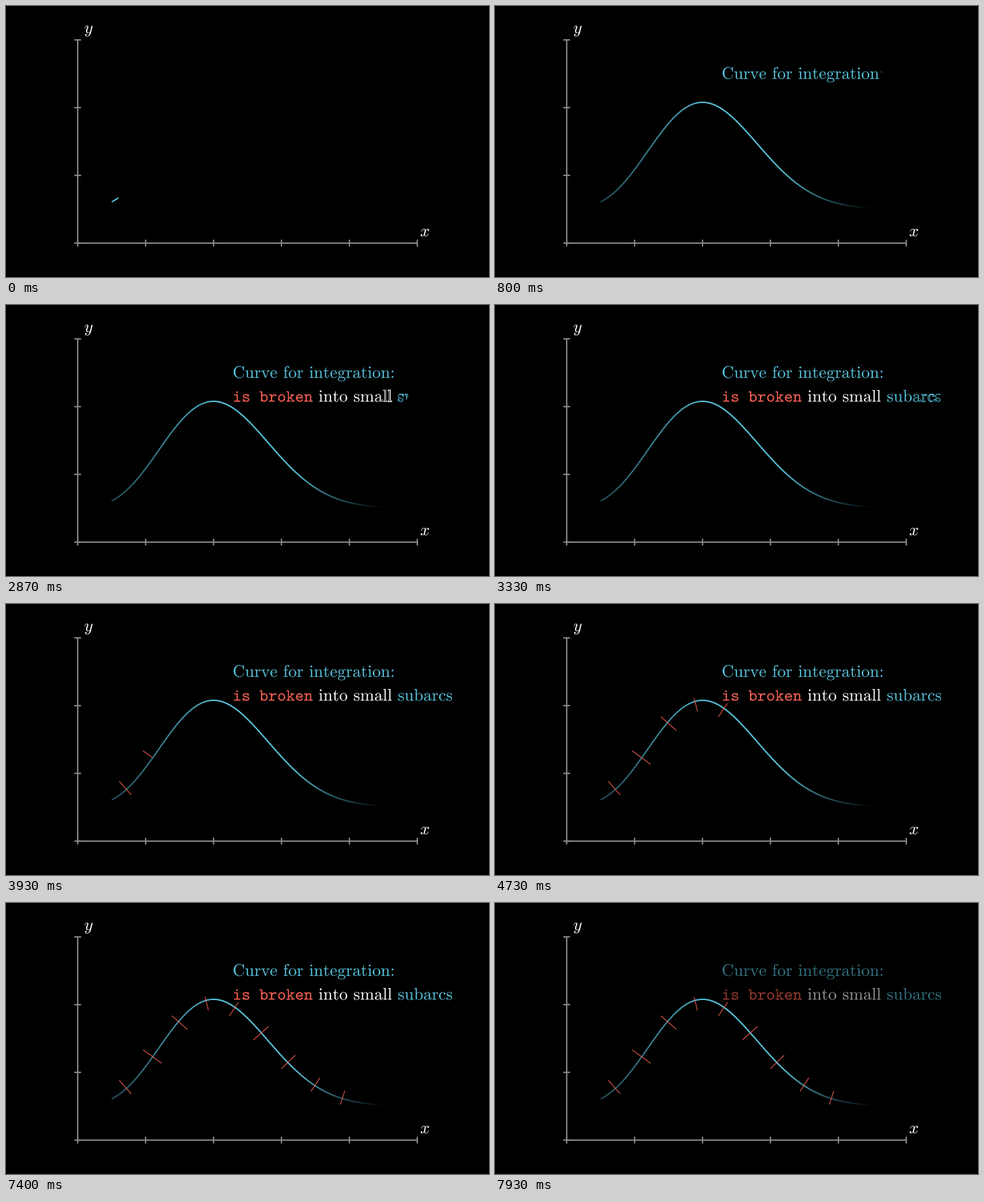
These frames come from a looping animation (640 by 360 pixels, 8000 ms). A matplotlib script:

```python
import numpy as np
import matplotlib.pyplot as plt
from matplotlib.animation import FuncAnimation
from matplotlib.collections import LineCollection
from matplotlib.colors import to_rgb
from matplotlib.patches import PathPatch
from matplotlib.path import Path
from matplotlib.text import Text
from matplotlib.textpath import text_to_path

W, H, DPI = 640, 360, 100
FRAMES, LOOP_MS = 120, 8000
PX = 72 / DPI  # one pixel in points
SECOND = 15    # frames per second
EM = 22.5
BLUE, RED, WHITE, GREY = "#58C4DD", "#FC6255", "#FFFFFF", "#888888"
ORIGIN = np.array([95, 315])
UNIT = 90

plt.rcParams["mathtext.fontset"] = "cm"
plt.rcParams["path.snap"] = False

fig = plt.figure(figsize=(W / DPI, H / DPI), dpi=DPI, facecolor="black")
ax = fig.add_axes([0, 0, 1, 1])
ax.set_xlim(0, W)
ax.set_ylim(H, 0)
ax.axis("off")


def smooth(t):
    t = np.clip(t, 0, 1)
    low = 1 / (1 + np.exp(5))
    return float(np.clip((1 / (1 + np.exp(-10 * (t - 0.5))) - low) / (1 - 2 * low), 0, 1))


def line(p, q, color, width, z=1):
    return ax.plot([p[0], q[0]], [p[1], q[1]], color=color, lw=width * PX,
                   solid_capstyle="butt", zorder=z)[0]


# --- glyph outlines ---

def glyphs(tex, x=0, y=0):
    """Outline polygons of each glyph, baseline starting at (x, y)."""
    prop = Text().get_fontproperties()
    infos, shapes, _ = text_to_path.get_glyphs_mathtext(prop, f"${tex}$")
    k = EM / text_to_path.FONT_SCALE
    result = []
    for name, gx, _, size in infos:
        verts, codes = shapes[name]
        polys = Path(verts, codes).to_polygons()
        polys.sort(key=lambda p: -p[:, 1].max())
        result.append([p * [k * size, -k * size] + [x + gx * k, y] for p in polys])
    return result


def cut(polys, part):
    """The first part (0 to 1) of the outlines, by length."""
    steps = [np.hypot(*np.diff(p, axis=0).T) for p in polys]
    left = part * sum(s.sum() for s in steps)
    out = []
    for p, s in zip(polys, steps):
        run = np.concatenate([[0], np.cumsum(s)])
        if left >= run[-1]:
            out.append(p)
            left -= run[-1]
            continue
        end = [np.interp(left, run, p[:, i]) for i in (0, 1)]
        out.append(np.vstack([p[run < left], end]))
        break
    return [p for p in out if len(p) > 1]


class Glyph:
    def __init__(self, polys, color):
        self.polys, self.rgb = polys, to_rgb(color)
        self.patch = PathPatch(Path(np.zeros((2, 2))), lw=0, joinstyle="round", zorder=4)
        ax.add_patch(self.patch)

    def show(self, part=1, fill=1, stroke=0, opacity=1):
        polys = cut(self.polys, part) if part < 1 else self.polys
        self.patch.set_visible(part > 0 and bool(polys))
        if not self.patch.get_visible():
            return
        self.patch.set_path(Path.make_compound_path(*map(Path, polys)))
        self.patch.set_facecolor((*self.rgb, fill * opacity))
        self.patch.set_edgecolor((*self.rgb, opacity if stroke > 0 else 0))
        self.patch.set_linewidth(stroke * PX)

    def write(self, t, opacity):
        """Outline first, then fill."""
        t = np.clip(t, 0, 1)
        if t < 0.5:
            self.show(2 * t, 0, 0.9, opacity)
        else:
            u = 2 * t - 1
            self.show(1, u, 0.9 * (1 - u), opacity)


# --- axes ---

def draw_axes():
    ox, oy = ORIGIN
    line((ox, oy), (ox + 5 * UNIT, oy), GREY, 1.8)
    line((ox, oy), (ox, oy - 3 * UNIT), GREY, 1.8)
    for i in range(6):
        x = ox + i * UNIT
        line((x, oy - 4.5), (x, oy + 4.5), GREY, 1.8)
    for i in range(4):
        y = oy - i * UNIT
        line((ox - 4.5, y), (ox + 4.5, y), GREY, 1.8)
    for name, center in (("x", (555, 301)), ("y", (109.5, 33.3))):
        polys = glyphs(name)[0]
        pts = np.vstack(polys)
        shift = np.array(center) - (pts.min(0) + pts.max(0)) / 2
        Glyph([p + shift for p in polys], WHITE).show()


# --- curve and its cuts ---

X0, X1 = 140, 500


def curve(px):
    d = (np.asarray(px, float) - ORIGIN[0]) / UNIT - 2
    k = 0.72 + 0.09 * np.exp(-1.1 * d)
    return ORIGIN[1] - UNIT * (0.5 + 1.578 * np.exp(-k * d * d))


def draw_curve(part):
    """Stroke shaded from one corner of its own bounding box to the other."""
    n = max(int(720 * part), 12)
    x = np.linspace(X0, X0 + (X1 - X0) * part, n + 1)
    pts = np.column_stack([x, curve(x)])
    low, high = pts.max(0), pts.min(0)
    axis = high - low
    pieces = [pts[i:i + 8] for i in range(0, n, 6)]
    mids = np.array([p.mean(0) for p in pieces])
    t = (mids - low) @ axis / (axis @ axis)
    shade = np.interp(t, [0, 1 / 3, 2 / 3, 1], [0, 1, 1, 0])
    stroke.set_segments(pieces)
    stroke.set_color(shade[:, None] * np.array(to_rgb(BLUE)))


def make_cuts():
    """Normals at the chord midpoints, all 18 px high."""
    cuts = []
    for i in range(9):
        xs = X0 + 36 * np.array([i, i + 1])
        ys = curve(xs)
        slope = (ys[0] - ys[1]) / 36
        mid = np.array([xs.mean(), ys.mean()])
        half = np.array([9 * slope, 9])
        cuts.append((mid - half, mid + half, line(mid, mid, RED, 0.9, z=5)))
    return cuts


draw_axes()
stroke = LineCollection([], linewidths=1.8 * PX, capstyle="butt", zorder=3)
ax.add_collection(stroke)
cuts = make_cuts()

SP = r"\hspace{0.38}"
title = [Glyph(g, BLUE) for g in glyphs(
    rf"\mathrm{{Curve{SP}for{SP}integration\hspace{{-0.2}}:}}", 300.3, 96.8)]
note_colors = [RED] * 8 + [WHITE] * 9 + [BLUE] * 7
note = [Glyph(g, c) for g, c in zip(glyphs(
    rf"\mathtt{{is\hspace{{0.598}}broken}}{SP}\mathrm{{into{SP}small{SP}subarcs}}",
    300.3, 128.4), note_colors)]


def update(k):
    opacity = 1 - smooth((k - 111) / SECOND)

    draw_curve(smooth((k + 2.35) / SECOND))

    done = smooth(k / SECOND) * len(title)
    for i, g in enumerate(title):
        g.show(np.clip(done - i, 0, 1), opacity=opacity)

    lag = 0.2
    t = np.clip((k - 23) / (2 * SECOND), 0, 1) * (1 + lag * (len(note) - 1))
    for i, g in enumerate(note):
        g.write(t - lag * i, opacity)

    t = (k - 53) / (2 * SECOND) * len(cuts)
    for i, (a, b, art) in enumerate(cuts):
        part = smooth(t - i)
        end = a + (b - a) * part
        art.set_data([a[0], end[0]], [a[1], end[1]])
        art.set_visible(part > 0)
    return []


anim = FuncAnimation(fig, update, frames=FRAMES, interval=LOOP_MS / FRAMES,
                     init_func=lambda: update(0), repeat=True, repeat_delay=0)
plt.show()
```
